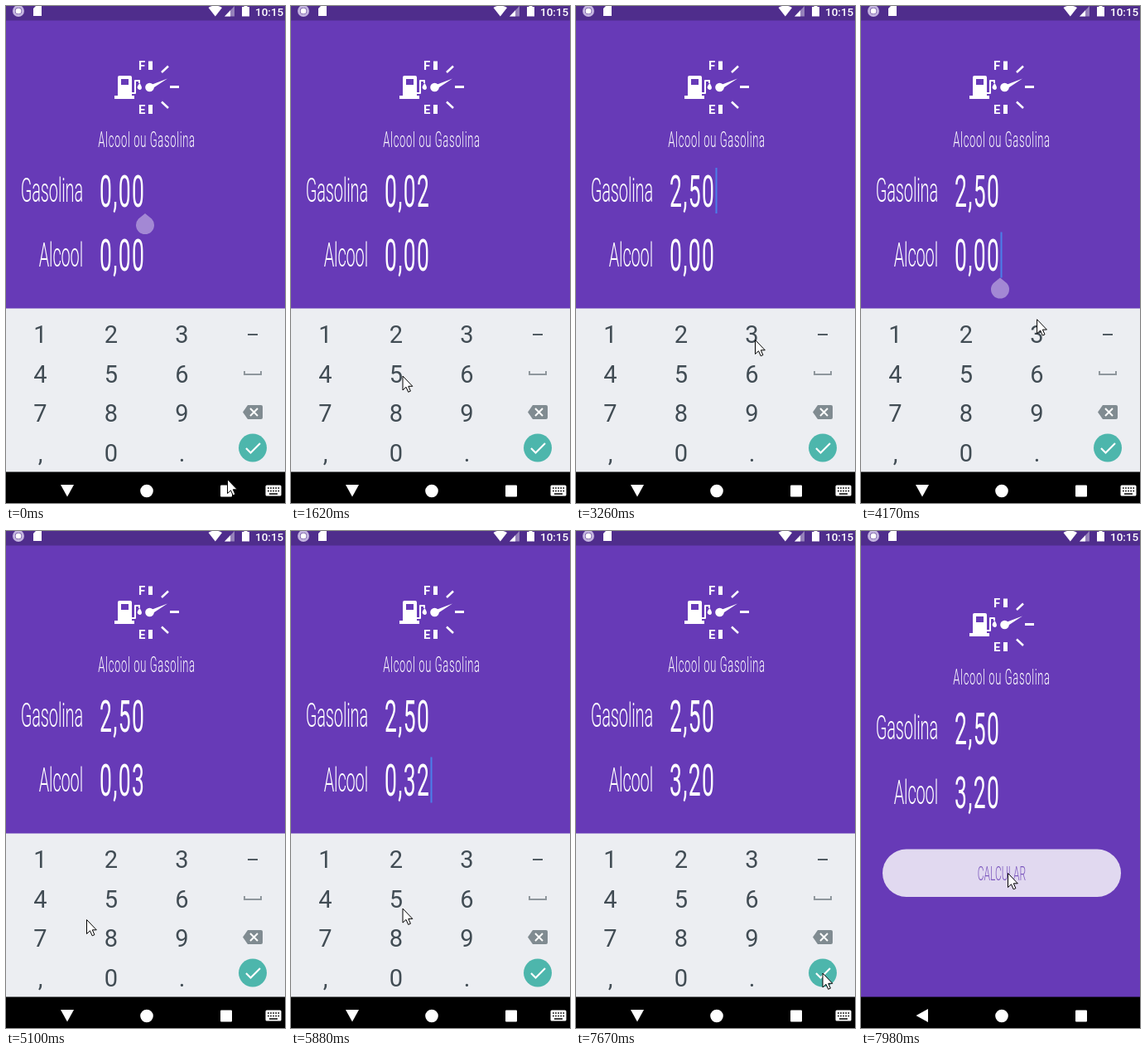
Animation, 337 px wide and 599 px high, one loop 8 s. Source, as an HTML page:

```html
<!DOCTYPE html>
<html lang="pt">
<head>
<meta charset="utf-8">
<title>Alcool ou Gasolina</title>
<style>
  html, body { margin: 0; width: 100%; height: 100%; overflow: hidden; background: #673ab7; }
  svg { display: block; width: 100%; height: 100%; font-family: Roboto, sans-serif; }
  .ink { fill: #fff; }
  .value { font-size: 53px; letter-spacing: 2.6px; }
  .label { font-size: 40px; font-weight: 300; letter-spacing: -.3px; text-anchor: end; }
  .title { font-size: 26px; font-weight: 300; letter-spacing: 1.3px; text-anchor: middle; }
  .button { font-size: 24px; font-weight: 300; text-anchor: middle; fill: #7a55bd; }
  .gauge { font-size: 15px; font-weight: 700; }
  .keys { font-size: 29px; fill: #414c54; text-anchor: middle; }
  .line { fill: none; stroke: #fff; }
</style>
</head>
<body>
<svg viewBox="0 0 337 599">
  <rect width="337" height="599" fill="#673ab7"/>

  <g id="content" class="ink">
    <path fill-rule="evenodd" d="M135 86q0-2 2-2h13q2 0 2 2v22h3v4h-24v-4h4zM139 88v7h9v-7z"/>
    <path class="line" stroke-width="2" stroke-linejoin="round" d="M152 105h4V90h5v3"/>
    <path d="M161.500 93q3.500 5 2 7t-4 0t2-7z"/>
    <circle cx="173.500" cy="98" r="5.300"/>
    <path d="M174 95.500L195 87.500L176 100z"/>
    <path class="line" stroke-width="2.500" d="M188 80l8-7.500M188 115.500l8 7.500"/>
    <path class="line" stroke-width="3" d="M198 97.500h11"/>
    <path d="M172 66.500h5v10.500h-5zM172 119h5v11h-5z"/>
    <text class="gauge" x="160" y="77">F</text>
    <text class="gauge" x="160" y="130">E</text>
    <text class="title" transform="translate(170 170) scale(.5 1)">Alcool ou Gasolina</text>
    <text class="label" transform="translate(93 236) scale(.5 1)">Gasolina</text>
    <text class="label" transform="translate(93 313.500) scale(.5 1)">Alcool</text>
    <text class="value" id="value0" transform="translate(113 241.500) scale(.5 1)"></text>
    <text class="value" id="value1" transform="translate(113 319) scale(.5 1)"></text>
    <g id="focus">
      <rect id="caret" x="168.500" y="195" width="2" height="55" fill="#4a80ea"/>
      <path id="handle" fill-opacity=".4" d="M168 250l8 6.500a11 11 0 1 1-16 0z"/>
    </g>
  </g>

  <g id="button">
    <rect x="26" y="383.500" width="288" height="57.500" rx="28.750" fill="#e1d9f0"/>
    <text class="button" transform="translate(170 420.500) scale(.5 1)">CALCULAR</text>
  </g>

  <g id="keyboard">
    <rect y="364.500" width="337" height="198" fill="#eceef2"/>
    <rect id="press" width="85" height="48" fill="#dfe3e8"/>
    <g id="keys" class="keys"></g>
    <path d="M292 395h12v2h-12z" fill="#525c63"/>
    <path d="M288 440v4h20v-4" fill="none" stroke="#8f979d" stroke-width="2"/>
    <path d="M286 489.500l6-8.500h16q2 0 2 2v13q0 2-2 2h-16z" fill="#808b91"/>
    <path class="line" stroke-width="2" d="M295 485l9 9M304 485l-9 9"/>
    <circle cx="298" cy="532.500" r="17" fill="#4db6ac"/>
    <path class="line" stroke-width="2.200" d="M290 533l5.500 5.500L307 527"/>
  </g>

  <g class="ink">
    <rect width="337" height="17.500" fill="#4f2d8c"/>
    <circle cx="15" cy="6" r="5.500" fill="none" stroke="#c3b4df" stroke-width="3"/>
    <circle cx="15" cy="6" r="3.500"/>
    <path d="M33 3l3-3h7v12H33z"/>
    <path d="M244.500 2q8-5 16.500 0L252.800 12.500z"/>
    <path d="M264 12.500L276 0v12.500z" fill-opacity=".4"/>
    <path d="M264 12.500l7-7.300v7.300z"/>
    <path d="M285 1h2.500V-1h4V1h2.500v11.500h-9z"/>
    <text x="301" y="11.500" font-size="13.500" font-weight="500">10:15</text>
  </g>

  <g class="ink">
    <rect y="561.500" width="337" height="38" fill="#000"/>
    <path id="back" d="M-8-7H8L0 7.500z"/>
    <circle cx="170" cy="584.500" r="7.800"/>
    <rect x="259" y="577.500" width="14" height="14" rx="1"/>
    <g id="switcher">
      <rect x="313.500" y="577.500" width="19" height="13" rx="1.500"/>
      <path d="M316 581h14.500M316 584.500h14.500" stroke="#000" stroke-width="1.700" stroke-dasharray="1.700 1.400"/>
      <path d="M318 588h10" stroke="#000" stroke-width="1.500"/>
    </g>
  </g>

  <path id="pointer" d="M.5.500v17l4-3.700 2.700 6 2.700-1.200-2.600-5.800h5z" fill="#fff" stroke="#000"/>
</svg>

<script>
const LOOP = 8000, CLOSE = 7720, BLINK = 500;
const KEYS = '123456789,0.';

const $ = id => document.getElementById(id);
const move = (id, x, y, extra = '') => $(id).setAttribute('transform', `translate(${x} ${y}) ${extra}`);
const show = (id, on) => $(id).setAttribute('visibility', on ? 'visible' : 'hidden');
const clamp = v => Math.min(1, Math.max(0, v));
const cell = key => [KEYS.indexOf(key) % 3, Math.floor(KEYS.indexOf(key) / 3)];
const spot = (column, row) => [53 + 81.5 * column, 402 + 43.5 * row];

for (const key of KEYS) {
  const [column, row] = cell(key);
  const text = document.createElementNS('http://www.w3.org/2000/svg', 'text');
  text.setAttribute('x', 41.5 + 85.5 * column);
  text.setAttribute('y', 406 + 47.6 * row);
  text.textContent = key;
  $('keys').append(text);
}

// Everything follows from what the pointer visits: fields, keys and resting places.
const rest = (time, at) => ({ time, at });
const focus = (time, field, at) => ({ time, field, at });
const type = (time, key) => ({ time, key, at: spot(...cell(key)) });
const start = [267, 570];
const visits = [
  focus(-BLINK, 0, start), rest(0, start),
  type(1080, '2'), type(1740, '5'), type(2780, '0'), rest(3320, spot(...cell('3'))),
  focus(3860, 1, [200, 300]),
  type(4480, '3'), rest(5100, [97, 468]), type(5540, '2'), type(6730, '0'),
  rest(CLOSE, spot(3, 3)), rest(LOOP + 160, [177, 412])
];

function pointerAt(t) {
  const next = visits.findIndex(v => v.time > t);
  const from = visits[next - 1], to = visits[next];
  const duration = Math.min(600, to.time - from.time - 280);
  const k = clamp((t - from.time - 80) / duration), eased = k * k * (3 - 2 * k);
  return from.at.map((v, axis) => v + (to.at[axis] - v) * eased);
}

function formAt(t) {
  const form = { cents: [0, 0], field: 0, last: null };
  for (const visit of visits.filter(v => v.time <= t)) {
    if (visit.key) form.cents[form.field] = form.cents[form.field] * 10 + Number(visit.key);
    else if (visit.field !== undefined) form.field = visit.field;
    else continue;
    form.last = visit;
  }
  return form;
}

function draw(t) {
  const { cents, field, last } = formAt(t);
  cents.forEach((n, i) => $('value' + i).textContent = (n / 100).toFixed(2).replace('.', ','));
  move('focus', 0, 77.5 * field);
  show('caret', t < CLOSE && Math.floor((t - last.time) / BLINK) % 2 === 0);
  show('handle', !last.key);

  const pressed = visits.find(v => v.key && t >= v.time - 40 && t < v.time + 180);
  show('press', pressed);
  if (pressed) {
    const [column, row] = cell(pressed.key);
    move('press', 85.3 * column, 372 + 47.5 * row);
  }

  const closed = t >= CLOSE + 80;
  move('content', 0, closed ? 15 : 0);
  show('button', closed);
  move('keyboard', 0, 200 * clamp((t - CLOSE) / 160) ** 2);
  move('back', 74, 584, closed ? 'rotate(90)' : '');
  show('switcher', !closed);
  move('pointer', ...pointerAt(t));
}

const began = performance.now();
function tick() {
  draw((performance.now() - began) % LOOP);
  requestAnimationFrame(tick);
}
draw(0);
requestAnimationFrame(tick);
</script>
</body>
</html>
```
